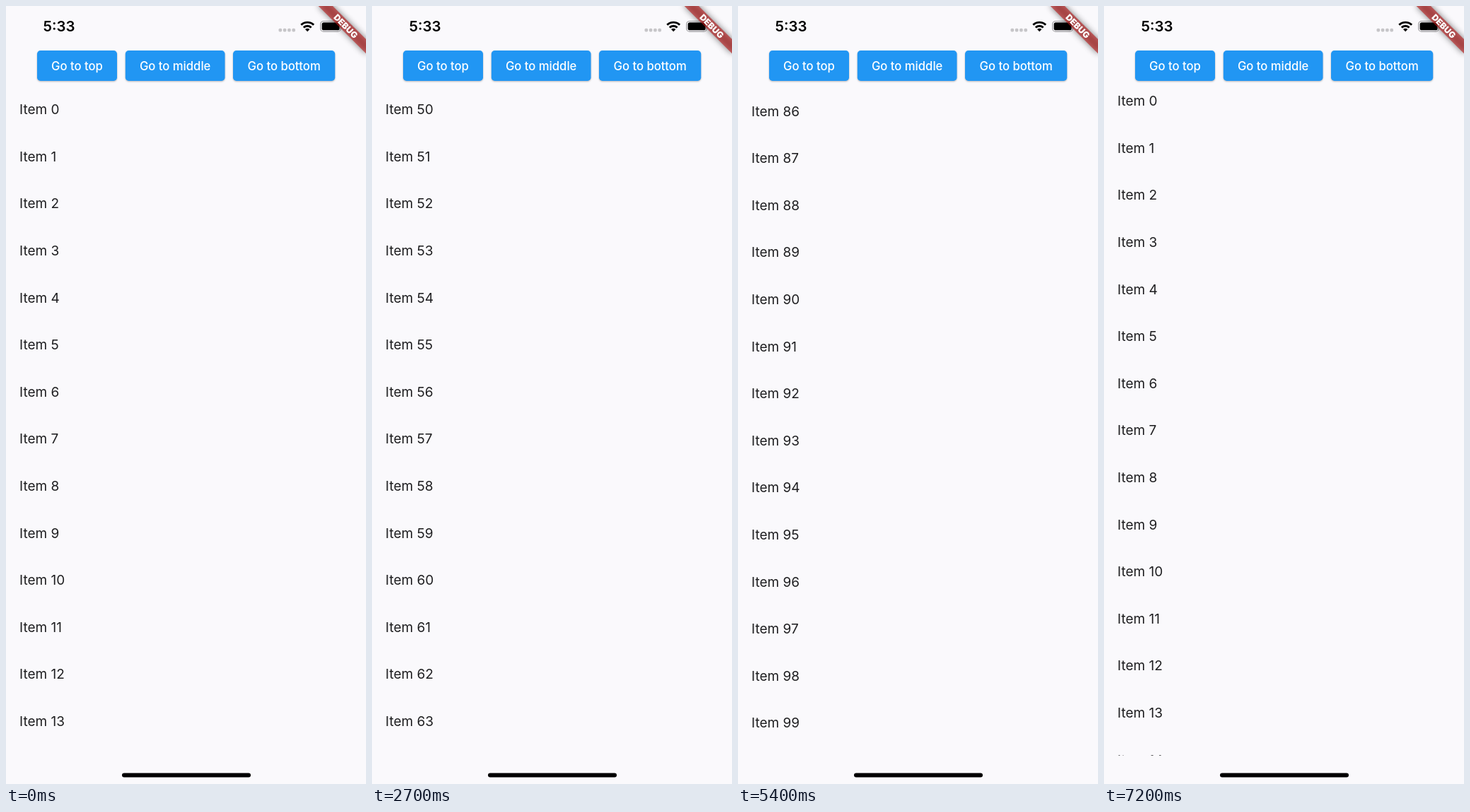
These frames come from a looping animation (509x1101 px, 7400 ms). An HTML page:

```html
<!DOCTYPE html>
<html lang="en">
<head>
<meta charset="utf-8">
<title>Scroll to item</title>
<style>
  html, body { margin: 0; width: 100%; height: 100%; overflow: hidden; background: #faf9fc; }
  svg { display: block; width: 509px; height: 1101px; font-family: Inter, Roboto, sans-serif; }
  #items { font-size: 19px; fill: #1f1f21; }
  .label { font-size: 16.65px; font-weight: 500; fill: #fff; text-anchor: middle; }
  .clock { font-size: 20.4px; font-weight: 600; text-anchor: middle; }
  .debug { font-size: 12.1px; font-weight: 900; fill: #fff; text-anchor: middle; }
</style>
</head>
<body>
<svg viewBox="0 0 509 1101">
  <defs>
    <clipPath id="view"><rect y="113" width="509" height="947.8"/></clipPath>
    <filter id="soft" x="-50%" y="-150%" width="200%" height="400%">
      <feGaussianBlur stdDeviation="4.7"/>
    </filter>
  </defs>

  <g clip-path="url(#view)"><g id="items"></g></g>
  <g id="buttons"></g>

  <text class="clock" x="75" y="36.2">5:33</text>
  <g fill="#c6c5c8">
    <rect x="385.5" y="31.8" width="4.6" height="4.6" rx="1.6"/>
    <rect x="391.8" y="31.8" width="4.6" height="4.6" rx="1.6"/>
    <rect x="398.1" y="31.8" width="4.6" height="4.6" rx="1.6"/>
    <rect x="404.4" y="31.8" width="4.6" height="4.6" rx="1.6"/>
  </g>
  <g fill="none" stroke="#000" stroke-width="2.9">
    <path d="M417.3 26.8A12.6 12.6 0 0 1 435.1 26.8"/>
    <path d="M420.8 30.5A7.6 7.6 0 0 1 431.6 30.5"/>
    <path d="M426.2 36.2L423 33A4.6 4.6 0 0 1 429.4 33Z" fill="#000" stroke="none"/>
  </g>
  <rect x="444.7" y="21.5" width="28.6" height="14.6" rx="4.2" fill="none" stroke="#9b9a9d" stroke-width="1.2"/>
  <rect x="446.6" y="23.3" width="25" height="11" rx="2.6"/>
  <path d="M474.8 26.3v5a2.6 2.6 0 0 0 0-5" fill="#9b9a9d"/>

  <g transform="translate(509 0) rotate(45)">
    <rect x="-47.6" y="33.3" width="95.2" height="14.3" opacity=".5" filter="url(#soft)"/>
    <rect x="-47.6" y="33.3" width="95.2" height="14.3" fill="#b71c1c" fill-opacity=".627"/>
    <text class="debug" y="44.9">DEBUG</text>
  </g>
  <rect x="164" y="1085.5" width="182" height="6" rx="3"/>
</svg>

<script>
const LOOP = 7400, STEP = 100, LAST = 7200;
const SCALE = 509 / 428, TILE = 56, COUNT = 100;
const MAX = TILE * COUNT - 797, MIDDLE = TILE * 50, BOTTOM = TILE * COUNT;
const NS = 'http://www.w3.org/2000/svg';

const clamp = v => Math.min(1, Math.max(0, v));
const mix = (a, b, k) => a + (b - a) * k;
const cubic = v => v < .5 ? 4 * v ** 3 : 1 - 4 * (1 - v) ** 3;

// Cubic bezier (.25, .1, .25, 1)
function ease(v) {
  const at = (a, b, s) => 3 * a * s * (1 - s) ** 2 + 3 * b * s * s * (1 - s) + s ** 3;
  let lo = 0, hi = 1;
  for (let i = 0; i < 20; i++) {
    const s = (lo + hi) / 2;
    if (at(.25, .25, s) < v) lo = s; else hi = s;
  }
  return at(.1, 1, lo);
}

function add(parent, tag, attrs, text) {
  const el = document.createElementNS(NS, tag);
  for (const k in attrs) el.setAttribute(k, attrs[k]);
  if (text) el.textContent = text;
  return parent.appendChild(el);
}

const items = document.getElementById('items');
for (let i = 0; i < COUNT; i++)
  add(items, 'text', { x: 19.03, y: 153.2 + i * TILE * SCALE }, 'Item ' + i);

const TOP = 63.1, HEIGHT = 42.8;
const buttons = [
  { label: 'Go to top', x: 44, w: 113, tapX: 102, tapY: 88, down: 6110, up: 6215 },
  { label: 'Go to middle', x: 168.8, w: 140.7, tapX: 253, tapY: 89, down: 1440, up: 1609 },
  { label: 'Go to bottom', x: 321, w: 144.2, tapX: 395, tapY: 88, down: 3650, up: 3765 }
];
buttons.forEach((b, i) => {
  const box = { x: b.x, y: TOP, width: b.w, height: HEIGHT, rx: 4.76 };
  const g = add(document.getElementById('buttons'), 'g', {});
  add(add(g, 'clipPath', { id: 'clip' + i }), 'rect', box);
  b.face = add(g, 'rect', { ...box, fill: '#2196f3' });
  b.ink = add(g, 'circle', { fill: '#fff', 'clip-path': `url(#clip${i})` });
  add(g, 'text', { class: 'label', x: b.x + b.w / 2, y: 90.5 }, b.label);
});

function drawButton(b, t) {
  // Slow growth while held, fast after release, then fade out
  const held = clamp((Math.min(t, b.up) - b.down) / 1000);
  const grow = ease(clamp(held + Math.max(0, t - b.up) / 225));
  const alpha = .24 * clamp((t - b.down) / 75) * (1 - clamp((t - b.up - 225) / 150));
  b.ink.setAttribute('cx', mix(b.tapX, b.x + b.w / 2, grow));
  b.ink.setAttribute('cy', mix(b.tapY, TOP + HEIGHT / 2, grow));
  b.ink.setAttribute('r', Math.hypot(b.w, HEIGHT) / 2 * mix(.3, 1, grow));
  b.ink.setAttribute('fill-opacity', alpha);

  const lift = clamp((Math.min(t, b.up) - b.down) / 200) * (1 - clamp((t - b.up) / 200));
  b.face.style.filter =
    `drop-shadow(0 ${mix(1.2, 4, lift)}px ${mix(1.3, 4, lift)}px rgba(0,0,0,.27))`;
}

// Overdamped spring back from the overscroll
function spring(s) {
  const a = 9.075, b = 22.04;
  return (b * Math.exp(-a * s) - a * Math.exp(-b * s)) / (b - a);
}

function scrollAt(t) {
  if (t >= 6303) return mix(MAX, 0, cubic(clamp((t - 6303) / 975.5)));
  if (t >= 5800) return MAX;
  if (t >= 4869) return mix(MAX, BOTTOM, spring((t - 4869) / 1000));
  if (t >= 3869) return mix(MIDDLE, BOTTOM, cubic((t - 3869) / 1000));
  return MIDDLE * cubic(clamp((t - 1709) / 1000));
}

function draw() {
  const t = Math.min(LAST, Math.floor(performance.now() % LOOP / STEP) * STEP);
  items.setAttribute('transform', `translate(0 ${-scrollAt(t) * SCALE})`);
  buttons.forEach(b => drawButton(b, t));
  requestAnimationFrame(draw);
}
draw();
</script>
</body>
</html>
```
